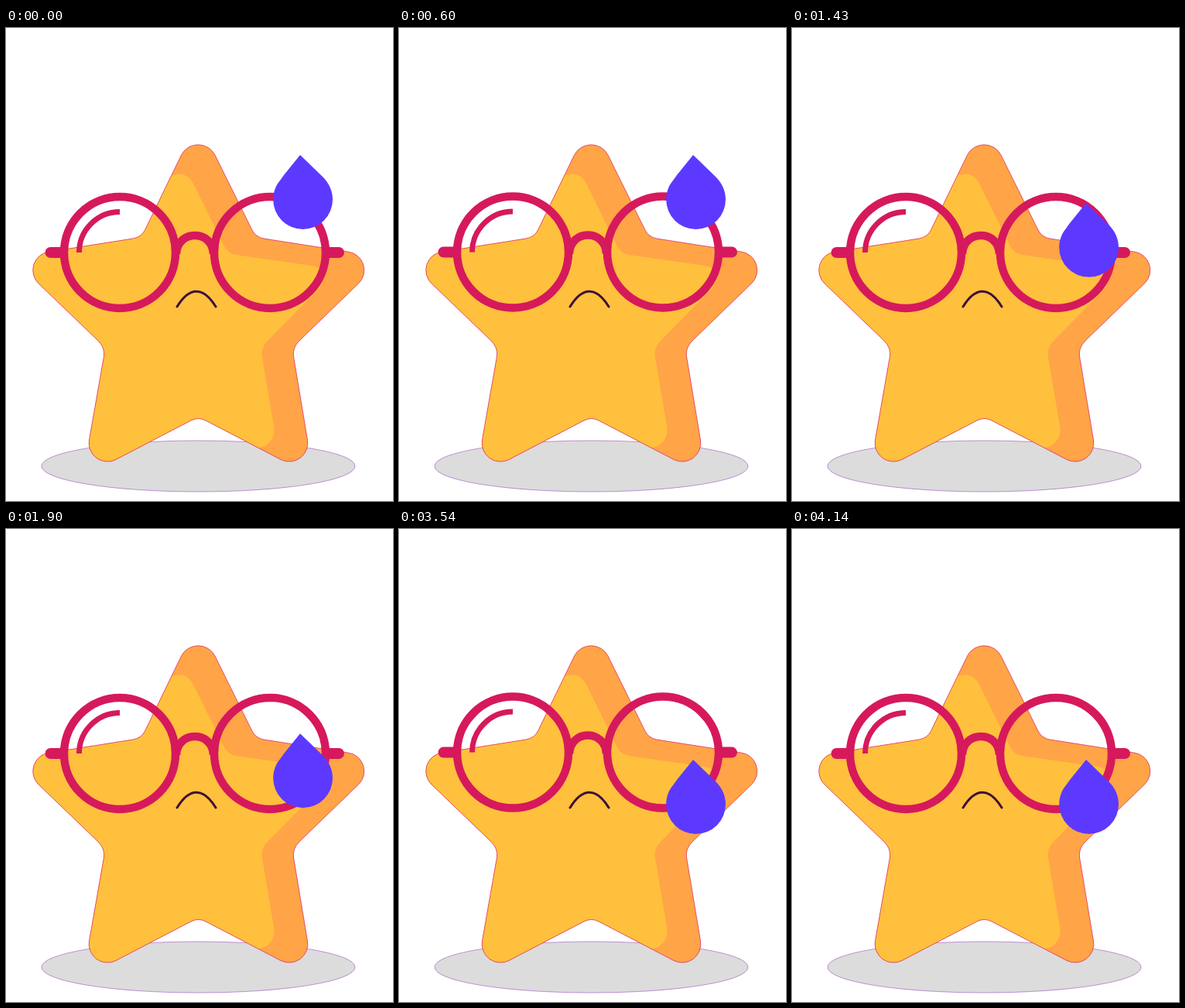
An HTML page for the animation above (7000 ms loop, 500 by 611 pixels).

```html
<!DOCTYPE html>
<html lang="en">
<head>
<meta charset="utf-8">
<title>Worried star</title>
<style>
html, body { margin: 0; height: 100%; overflow: hidden; background: #fff; }
svg { display: block; width: 100vw; height: 100vh; }
</style>
</head>
<body>
<svg viewBox="0 0 500 611">
  <defs>
    <path id="star" d="M226.5 164 A24.5 24.5 0 0 1 270 164 L318 261 Q322.500 270 333 272 L442 289
      A24 24 0 0 1 456 329.500 L379 404 Q370 413 371.500 424 L389.500 532 A24 24 0 0 1 355 557.500
      L258 507 Q248.500 502 239 507 L142 557.500 A24 24 0 0 1 107.500 532 L126.500 424
      Q128 413 119 404 L42.500 330.500 A24 24 0 0 1 56 289 L164 272 Q175 270 179.500 261 Z"/>
    <clipPath id="body"><use href="#star"/></clipPath>
  </defs>
  <ellipse cx="248.5" cy="566" rx="202.5" ry="33" fill="#dcdcdc" stroke="#9b4fc0" stroke-width=".6"/>
  <use href="#star" fill="#ffa447"/>
  <path clip-path="url(#body)" fill="#ffc03d" d="M0 190 H216 Q233 184 242 201 L281 280 Q286 291 297 293
    L395 307 Q409 309 409 322 Q409 332 401 340 L338 404 Q329 413 331 425 L346 514
    C349 530 338 542 325 542 L290 580 H0 Z"/>
  <use href="#star" fill="none" stroke="#d81b60" stroke-width=".7"/>
  <path d="M221 360 C237 333.500 255 333.500 271 360" fill="none" stroke="#3d1038" stroke-width="3" stroke-linecap="round"/>
  <g id="glasses" fill="none" stroke="#d6195c" stroke-width="10.5">
    <circle cx="147" cy="290" r="72"/>
    <circle cx="341" cy="290" r="72"/>
    <path d="M220 292 C221 260 267 260 268 292"/>
    <path d="M57.500 290 H72 M416 290 H430" stroke-width="14" stroke-linecap="round"/>
    <path d="M94.500 290 A52.500 52.500 0 0 1 147 237.500" stroke-width="7"/>
  </g>
  <path id="drop" fill="#5d39ff" d="M380 164 L409 192 C418 201 422 211 422 221.500
    A38.400 38.400 0 0 1 345.200 221.500 C345.200 213 348 204 354 197 L359 190 Z"/>
</svg>
<script>
const LOOP = 7000;
const glasses = document.getElementById('glasses');
const drop = document.getElementById('drop');

// Steady start, soft stop: cubic bezier (1/6, 1/6) (2/3, 1)
function ease(p) {
  if (p <= 0) return 0;
  if (p >= 1) return 1;
  const curve = (s, a, b) => 3 * a * s * (1 - s) ** 2 + 3 * b * s * s * (1 - s) + s ** 3;
  let lo = 0, hi = 1;
  for (let i = 0; i < 20; i++) {
    const mid = (lo + hi) / 2;
    if (curve(mid, 1 / 6, 2 / 3) < p) lo = mid; else hi = mid;
  }
  return curve(lo, 1 / 6, 1);
}

const ramp = (t, from, to) => ease((t - from) / (to - from));
const hop = (t, start) => 12 * (ramp(t, start, start + 325) - ramp(t, start + 325, start + 645));
const shift = (el, y) => el.setAttribute('transform', `translate(0 ${y.toFixed(2)})`);

function draw(now) {
  const t = now % LOOP;
  shift(glasses, -hop(t, 0) - hop(t, 3508));
  shift(drop, 134 * ramp(t, 740, 2670));
}

let start;
function tick(now) {
  start ??= now;
  draw(now - start);
  requestAnimationFrame(tick);
}
draw(0);
requestAnimationFrame(tick);
</script>
</body>
</html>
```
